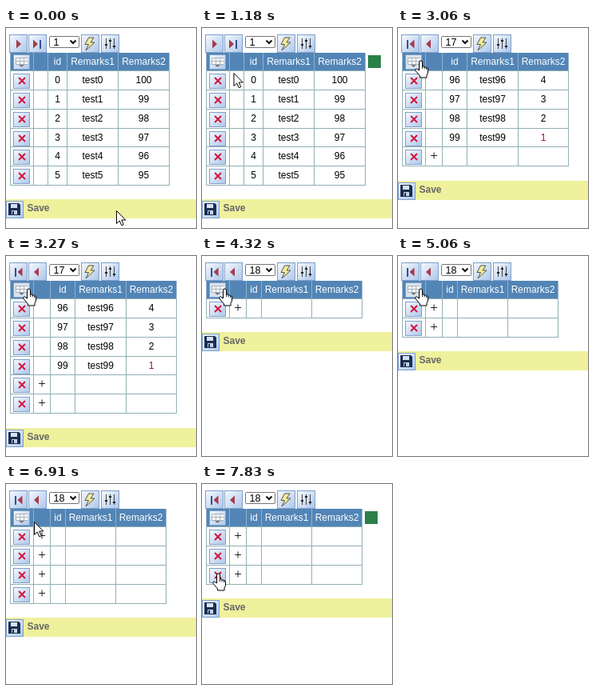
Animation of 238x250 px, one loop 8 s. Source, as an HTML page:

```html
<!DOCTYPE html>
<html lang="en">
<head>
<meta charset="utf-8">
<title>Editable table</title>
<style>
html, body { margin: 0; height: 100%; overflow: hidden; background: #fff; }
svg { display: block; width: 100vw; height: 100vh; font: 12px "Liberation Sans", Arial, sans-serif; }
.c { text-anchor: middle; }
rect { shape-rendering: crispEdges; }
</style>
</head>
<body>
<svg viewBox="0 0 238 250">
  <defs>
    <linearGradient id="face" x2="1" y2="1">
      <stop stop-color="#f4f8ff"/><stop offset="1" stop-color="#aec8ea"/>
    </linearGradient>
  </defs>
  <g id="view"></g>
</svg>
<script>
const LOOP = 8000, HEAD = 31;
// Rows have fractional heights and snap to whole pixels
const TOP = 53.7, DATA_ROW = 23.8, BLANK_ROW = 24, GAP = 18.2;
const NAVY = '#34518f', RED = '#a83a4c', LINE = '#91b0b5';
const view = document.getElementById('view');

const rect = (x, y, w, h, fill) => `<rect x="${x}" y="${y}" width="${w}" height="${h}" fill="${fill}"/>`;
const path = (d, fill, more = '') => `<path d="${d}" fill="${fill}" ${more}/>`;
const text = (x, y, s, fill = '#000', more = 'class="c"') => `<text x="${x}" y="${y}" fill="${fill}" ${more}>${s}</text>`;
const at = (x, y, s) => `<g transform="translate(${x} ${y})">${s}</g>`;
const button = (x, y, w, h, face = 'url(#face)') =>
  rect(x, y, w, h, '#7f9fc9') + rect(x + 1, y + 1, w - 2, h - 2, face);

// Cursor shapes, with the hot spot at 0,0
const ARROW = path('M.5 .5V16.5L4.2 13L6.8 18.8L9.3 17.7L6.8 12H11.8Z', '#fff', 'stroke="#000"');
const HAND = path('M-2 12V2Q-2 0 0 0T2 2V7Q4 6 4.5 8Q6.5 7 7 9Q9 8 9 11V15L7.5 18V21H-1V19L-6 13Q-8 10 -5 10Z',
  '#fff', 'stroke="#000"') + path('M2 7V10M4.5 8V10.5M7 9V11', 'none', 'stroke="#000" stroke-width=".8"');

const BOLT = path('M9.5 4L5 12.5H9.5L6 20L17 10H12L16 4Z', '#f5ec9a', 'stroke="#444" stroke-width=".9"');
const SLIDERS = [[6, 12], [11, 7], [16, 14]].map(([x, y]) =>
  rect(x, 5, 1, 13, '#444') + rect(x - 1, y, 3, 2, '#222')).join('');
const CROSS = path('M6.5 5.5L14.5 13.5M14.5 5.5L6.5 13.5', 'none', 'stroke="#d3163f" stroke-width="2"');
const GRID = rect(3, 4, 15, 9, '#a9b1ba') +
  [0, 1, 2].map(i => rect(4 + 5 * i, 5, 4, 3, '#fff') + rect(4 + 5 * i, 9, 4, 3, '#fff')).join('') +
  path('M7 13H14L10.5 16Z', '#6f7b88');
const DISK = path('M3 3H16L18 5V18H3Z', '#1d2d50') + rect(6, 4, 8, 5, '#d5e2f3') +
  rect(7, 12, 7, 5, '#c3d2e8') + rect(8, 13, 2, 4, '#1d2d50');

function toolbar(page, nav) {
  let s = '';
  if (nav) {
    s += button(4, 8, 23, 23) + button(28, 8, 23, 23);
    s += nav > 0
      ? path('M13 14.5V25.5L19 20ZM34 14.5V25.5L40 20Z', RED) + rect(42, 15, 2, 11, NAVY)
      : rect(11, 15, 2, 11, NAVY) + path('M20.5 14.5V25.5L14.5 20ZM41 14.5V25.5L35 20Z', RED);
  }
  const dx = nav ? 0 : -46;
  return s + at(dx, 0,
    `<rect x="54.5" y="10.5" width="37" height="14" rx="2" fill="#fff" stroke="#767676"/>` +
    text(59.5, 22, page, '#000', 'font-size="12.5"') +
    path('M80.5 15.5L84 19L87.5 15.5', 'none', 'stroke="#111" stroke-width="2"') +
    button(94, 8, 23, 23) + at(94, 8, BOLT) + button(119, 8, 23, 23) + at(119, 8, SLIDERS));
}

function table(cols, rows, face) {
  const width = cols[5] - 4;
  const mid = i => (cols[i] + cols[i + 1]) / 2 + .5;
  let s = rect(5, HEAD, width, 22, '#5285b6'), edge = TOP;
  ['id', 'Remarks1', 'Remarks2'].forEach((h, i) => s += text(mid(i + 2), 46, h, '#fff'));
  s += button(9, 33, 21, 19, face) + at(9, 33, GRID);
  for (const cells of rows) {
    const y = Math.floor(edge);
    s += rect(5, y, width, 1, LINE) + button(9, y + 4, 21, 19) + at(9.5, y + 3.5, CROSS);
    if (cells) cells.forEach((c, i) => s += text(mid(i + 2), y + 16, c, c === '1' && i === 2 ? '#8c1250' : '#000'));
    else s += text(45, y + 17, '+', '#000', 'class="c" font-size="17" font-family="Liberation Serif, serif"');
    edge += cells ? DATA_ROW : BLANK_ROW;
  }
  const bottom = Math.floor(edge), bar = Math.floor(edge + GAP);
  s += rect(5, bottom, width, 1, LINE);
  for (const x of cols) s += rect(x, HEAD, 1, 22, '#8fb0cf') + rect(x, 53, 1, bottom - 53, LINE);
  return s + rect(0, bar, 238, 24, '#eff19c') + button(0, bar + 2, 22, 22) + at(0, bar + 2, DISK) +
    text(26.5, bar + 15, 'Save', '#666', 'font-weight="bold"');
}

const records = (from, n) => Array.from({ length: n }, (_, i) =>
  [from + i, 'test' + (from + i), 100 - from - i].map(String));
const blanks = n => Array(n).fill(null);
const lerp = (a, b, p) => a + (b - a) * p;

// Sampled pointer travel: n equal steps, the first one at the start time
const steps = (t, start, end, n) => Math.min(n, Math.floor((t - start) / (end - start) * (n - 1) + 1e-6) + 1);

function pointer(t) {
  if (t < 660) return [138, 228, false];
  if (t < 6910) {
    const k = steps(t, 660, 1380, 11);
    if (k > 10) return [28.5, 41, true];
    const p = k / 10, e = p * p * (3 - 2 * p);
    const x = lerp(138, 28, e), y = lerp(228, 36, e);
    return [x, y, x < 31 && y > 32];
  }
  if (t < 7260) {
    const p = (steps(t, 6910, 7260, 6) - 1) / 5, e = p * p * (3 - 2 * p);
    return [lerp(35, 20.5, e), lerp(47, 110, e), p > .7];
  }
  return [20.5, t < 7410 ? 110 : t < 7470 ? 114 : 112, true];
}

function scene(t) {
  const [x, y, hand] = pointer(t);
  let page, nav, cols, rows;
  if (t < 1810) {
    [page, nav, cols, rows] = [1, 1, [5, 34, 52, 76, 140, 204], records(0, 6)];
  } else if (t < 4320) {
    [page, nav, cols] = [17, t < 2120 ? 0 : -1, [5, 34, 55, 86, 150, 213]];
    rows = [...records(96, 4), ...blanks(t < 3270 ? 1 : 2)];
  } else {
    [page, nav, cols] = [18, -1, [5, 34, 55, 74, 137, 200]];
    rows = blanks(t < 5060 ? 1 : t < 5710 ? 2 : t < 6440 ? 3 : t < 7830 ? 4 : 3);
  }
  const pressed = [[3210, 3270], [4260, 4320], [5630, 5710], [6360, 6440]].some(([a, b]) => t >= a && t < b);
  const face = pressed ? '#b9c8da' : hand && y < TOP ? '#dce4ee' : undefined;
  const exportShown = t < 3060 ? y < 197 : t >= 6990;
  return toolbar(page, nav) + table(cols, rows, face) +
    (exportShown ? rect(cols[5] + 4, 34, 16, 16, '#2b8048') : '') +
    at(x, y, hand ? HAND : ARROW);
}

let last = '';
function draw() {
  const s = scene(performance.now() % LOOP);
  if (s !== last) view.innerHTML = last = s;
  requestAnimationFrame(draw);
}
draw();
</script>
</body>
</html>
```
